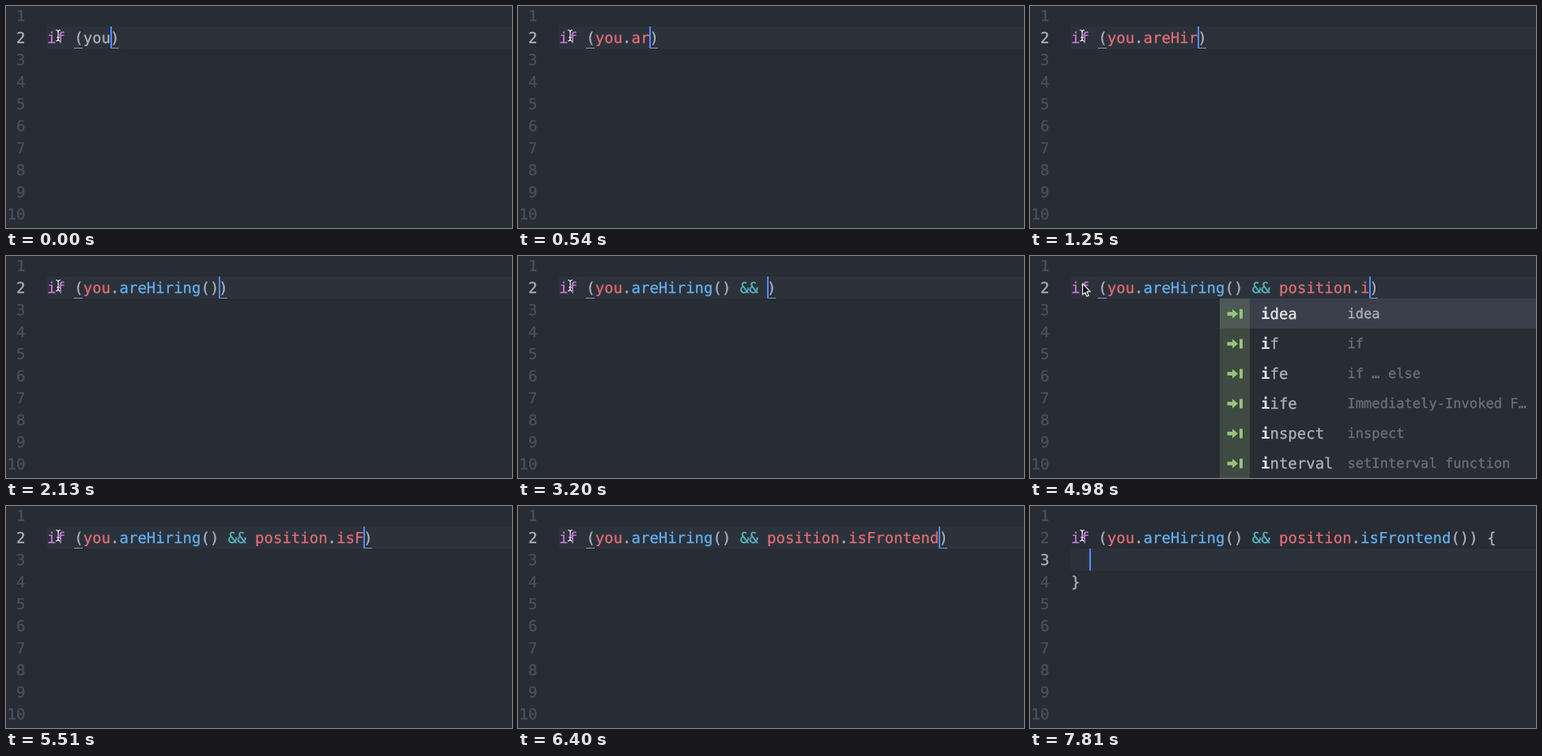
Recreate the animation shown at these times as an HTML page. Size 640x282 px, loop 8000 ms.

```html
<!DOCTYPE html>
<html lang="en">
<head>
<meta charset="utf-8">
<title>Typing code</title>
<style>
  html, body { margin: 0; height: 100%; overflow: hidden; background: #282c34; }
  svg { display: block; width: 100%; height: 100%; }
  text {
    font: 19px "DejaVu Sans Mono", monospace;
    font-variant-ligatures: none;
    text-rendering: geometricPrecision;
    white-space: pre;
    stroke-width: .3px;
  }
  .info { font-size: 17.1px; }
  .hit { font-weight: bold; stroke: none; }
</style>
</head>
<body>
<svg id="stage" viewBox="0 0 640 282"></svg>
<script>
const LOOP = 8000, TICK = LOOP / 45;
const LEFT = 52, ADV = 19 * 0.60205, LINE = 28, ROW = 38;
const COLOR = {
  bg: "#282c34", active: "#2c323b", selected: "#3a3f4b",
  plain: "#abb2bf", dim: "#495061", bright: "#e4e6eb", info: "#6b717d",
  keyword: "#c678dd", prop: "#e06c75", call: "#61afef", op: "#56b6c2",
  caret: "#528bff", match: "#7f9bd0", snippet: "#98c379"
};

// Each burst is typed evenly between two ticks.
const START = "if (you";
const BURSTS = [
  { text: ".areHiring() ", from: 0, to: 13 },
  { text: "&& ", from: 14, to: 18 },
  { text: "position", from: 19, to: 25 },
  { text: ".", from: 25, to: 26 },
  { text: "is", from: 27, to: 29 },
  { text: "Frontend", from: 30, to: 36 },
  { text: "()) {", from: 36, to: 42 }
];
const NEWLINE_TICK = 43;

const SNIPPETS = [
  ["af", "async function"], ["idea", "idea"], ["if", "if"], ["ife", "if … else"],
  ["iife", "Immediately-Invoked F…"], ["inspect", "inspect"],
  ["interval", "setInterval function"], ["prom", "new Promise"], ["proto", "Prototype"]
];

const stage = document.getElementById("stage");
const colX = col => LEFT + col * ADV;
const baseY = line => line * LINE - 9;
const rect = (x, y, w, h, fill, extra = "") =>
  `<rect x="${x}" y="${y}" width="${w}" height="${h}" fill="${fill}" ${extra}/>`;
const text = (x, y, s, color, extra = "") =>
  `<text x="${x}" y="${y}" fill="${color}" stroke="${color}" ${extra}>${s.replace(/&/g, "&amp;")}</text>`;

function typedAt(tick) {
  return BURSTS.reduce((code, { text, from, to }) => {
    const part = Math.min(1, Math.max(0, (tick - from) / (to - from)));
    return code + text.slice(0, Math.round(part * text.length));
  }, START);
}

// The editor closes every bracket still open before the caret.
function autoClose(code) {
  let rest = "";
  for (const c of code) {
    if (c === "(") rest = ")" + rest;
    else if (c === "{") rest = "}" + rest;
    else if (c === ")") rest = rest.slice(1);
  }
  return rest;
}

function tokenColor(token, before, after) {
  if (token === "if") return COLOR.keyword;
  if (token[0] === "&") return COLOR.op;
  if (!/\w/.test(token)) return COLOR.plain;
  if (before.endsWith(".")) return after[0] === "(" ? COLOR.call : COLOR.prop;
  return /^\.\w/.test(after) ? COLOR.prop : COLOR.plain;
}

function codeLine(code, line) {
  let out = "";
  for (const m of code.matchAll(/\w+|&+|[^\w\s&]+/g)) {
    const end = m.index + m[0].length;
    const color = tokenColor(m[0], code.slice(0, m.index), code.slice(end));
    out += text(colX(m.index), baseY(line), m[0], color);
  }
  return out;
}

function gutter(active) {
  let out = "";
  for (let n = 1; n <= 10; n++) {
    const color = n === active ? COLOR.plain : COLOR.dim;
    out += text(24.5, baseY(n), String(n), color, 'text-anchor="end"');
  }
  return out;
}

const caret = (col, line) =>
  rect(Math.round(colX(col)), (line - 1) * LINE - 2, 2, LINE, COLOR.caret);
const underline = col => rect(Math.round(colX(col)), 53, 11, 1, COLOR.match);

// Same first letter, then the other letters in order.
const suggestions = word =>
  word ? SNIPPETS.filter(([name]) => new RegExp("^" + [...word].join(".*")).test(name)) : [];

function popupRow([name, info], y, x, width, infoX, word, chosen) {
  let out = rect(x, y, width, ROW, chosen ? COLOR.selected : COLOR.bg);
  out += rect(x, y, ROW, ROW, COLOR.snippet, 'opacity=".2"');
  out += `<path transform="translate(${x} ${y})" fill="${COLOR.snippet}"
    d="M9.5 17.2h6.5v-3.7l7 6-7 6v-3.7h-6.5zM25 13.5h4v12h-4z"/>`;
  let found = 0;
  [...name].forEach((c, i) => {
    const hit = c === word[found];
    if (hit) found++;
    const color = hit || chosen ? COLOR.bright : COLOR.plain;
    out += text(x + 52 + i * ADV, y + 26, c, color, hit ? 'class="hit"' : "");
  });
  return out + text(infoX, y + 25, info, chosen ? COLOR.plain : COLOR.info, 'class="info"');
}

function popup(rows, word, wordX) {
  const longest = k => Math.max(...rows.map(r => r[k].length));
  const nameWidth = longest(0) * ADV;
  const width = Math.min(400, Math.round(90 + nameWidth + longest(1) * ADV * 0.9));
  const x = Math.min(Math.round(wordX - 52), 640 - width);
  return rows.map((row, i) =>
    popupRow(row, 54 + i * ROW, x, width, x + 70 + nameWidth, word, i === 0)).join("");
}

function pointer(arrow) {
  if (arrow) {
    return `<path d="M66.5 35v14.2l3.2-2.9 2.2 5 2.3-1-2.2-4.9h4.4z"
      fill="#111" stroke="#fff" stroke-width="1.1" stroke-linejoin="round"/>`;
  }
  const beam = "M63 30.5q3 0 3 2.5v9q0 2.5-3 2.5M69 30.5q-3 0-3 2.5v9q0 2.5 3 2.5M64 40h4";
  return `<g fill="none"><path d="${beam}" stroke="#1b1d22" stroke-width="2.6"/>
    <path d="${beam}" stroke="#fff" stroke-width="1.2"/></g>`;
}

function scene(tick) {
  const broken = tick >= NEWLINE_TICK;
  const line = broken ? 3 : 2;
  const code = typedAt(tick);
  const full = broken ? code : code + autoClose(code);
  const word = code.match(/\w*$/)[0];
  const rows = suggestions(word);

  let out = rect(0, 0, 640, 282, COLOR.bg);
  out += rect(LEFT, (line - 1) * LINE - 2, 640 - LEFT, LINE, COLOR.active);
  out += gutter(line) + codeLine(full, 2);
  if (broken) {
    out += codeLine("}", 4) + caret(2, 3);
  } else {
    out += underline(full.indexOf("(")) + underline(full.lastIndexOf(")"));
    out += caret(code.length, 2);
  }
  if (rows.length) out += popup(rows, word, colX(code.length - word.length));
  return out + pointer(rows.length > 2);
}

let shown = -1;
function update() {
  const tick = Math.floor((performance.now() % LOOP) / TICK + 0.05);
  if (tick !== shown) stage.innerHTML = scene(shown = tick);
  requestAnimationFrame(update);
}
update();
</script>
</body>
</html>
```
